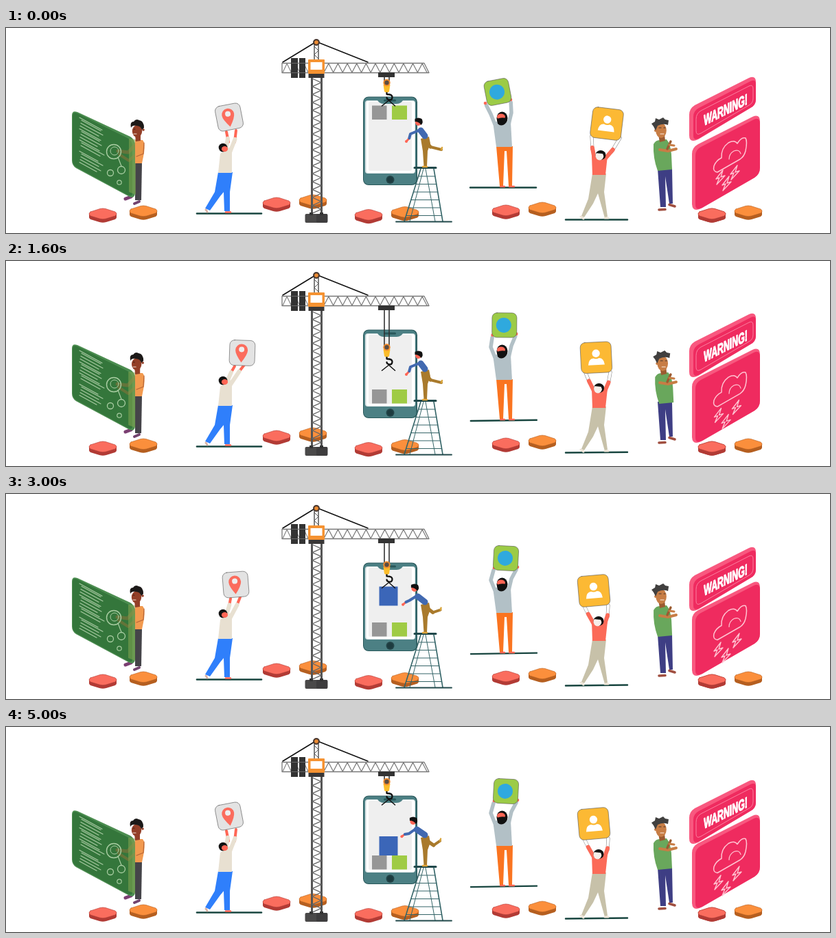
An HTML page with a canvas for the animation above (5200 ms loop, 1200x300 px).

```html
<!DOCTYPE html>
<html lang="en">
<head>
<meta charset="utf-8">
<title>App construction</title>
<style>
html, body { margin: 0; width: 100%; height: 100%; overflow: hidden; background: #fff; }
canvas { display: block; width: 1200px; height: 300px; }
</style>
</head>
<body>
<canvas id="stage" width="1200" height="300"></canvas>
<script>
const ctx = document.getElementById('stage').getContext('2d');
const LOOP = 5200, STEP = 200;
const RED = '#ff6655', INK = '#111', STEEL = '#555', TEAL = '#4c8084', DEEP = '#17453f';
ctx.lineJoin = ctx.lineCap = 'round';

// Drawing helpers
function fill(d, color) {
  ctx.fillStyle = color;
  ctx.fill(new Path2D(d));
}
function stroke(d, color, w = 1) {
  ctx.strokeStyle = color;
  ctx.lineWidth = w;
  ctx.stroke(new Path2D(d));
}
function rect(x, y, w, h, color, r = 0) {
  ctx.fillStyle = color;
  ctx.beginPath();
  ctx.roundRect(x, y, w, h, r);
  ctx.fill();
}
function dot(x, y, r, color, ry = r) {
  ctx.fillStyle = color;
  ctx.beginPath();
  ctx.ellipse(x, y, r, ry, 0, 0, Math.PI * 2);
  ctx.fill();
}
function ring(x, y, r, color, w) {
  ctx.strokeStyle = color;
  ctx.lineWidth = w;
  ctx.beginPath();
  ctx.arc(x, y, r, 0, Math.PI * 2);
  ctx.stroke();
}
function limb(color, w, ...pts) {
  ctx.strokeStyle = color;
  ctx.lineWidth = w;
  ctx.beginPath();
  pts.forEach(([x, y]) => ctx.lineTo(x, y));
  ctx.stroke();
}
function at(x, y, deg, draw) {
  ctx.save();
  ctx.translate(x, y);
  ctx.rotate(deg * Math.PI / 180);
  draw();
  ctx.restore();
}

// Motion helpers
const mix = (a, b, k) => a + (b - a) * k;
const mixPt = (a, b, k) => [mix(a[0], b[0], k), mix(a[1], b[1], k)];
function track(t, keys) {
  for (let i = 1; i < keys.length; i++) {
    const [t0, v0] = keys[i - 1], [t1, v1] = keys[i];
    if (t <= t1) return mix(v0, v1, (t - t0) / (t1 - t0));
  }
  return keys[keys.length - 1][1];
}
const SWAY = [[0, 0], [600, .45], [1000, 1], [1300, 1], [1600, .82], [2000, 0]];
const PIN = [[0, 0], [1400, 1], [1700, 1], [2450, 0], [2600, 0], [3400, 1], [3650, 1], [4950, 0]];
const REACH = [[0, 0], [1000, .9], [1600, 0], [2600, .5], [3600, 1], [4600, .5], [5000, .95]];
const LEAN = [[0, 0], [1000, 1], [1600, .9], [2600, 0], [3600, .1], [4600, .9], [5000, 0]];
const HOOK = [[0, 80], [1300, 154], [2100, 80], [2330, 80], [3700, 128], [4950, 80]];

function tile(x, y, top, side) {
  const d = 'M-18 -3L-4 -7.5Q0 -8.5 4 -7.5L18 -3Q22 0 18 3L5 7Q0 8.5 -5 7L-18 3Q-22 0 -18 -3Z';
  ctx.save();
  ctx.translate(x, y + 5);
  for (let i = 0; i < 5; i++) {
    fill(d, side);
    ctx.translate(0, -1);
  }
  fill(d, top);
  stroke(d, side, .6);
  ctx.restore();
}
function tiles() {
  for (const [x, y] of [[141, 272], [394, 256], [528, 273.5], [728, 267], [1028, 272]]) {
    tile(x, y, '#fa6d5e', '#b23b35');
    tile(x + (x < 150 ? 59 : 53), y - 4, '#fb8f3c', '#b55f20');
  }
}

function glassPanel() {
  fill('M96 128Q96 120 104 123L181 159Q188 163 188 172L188 242Q187 250 180 247L102 205Q96 201 96 194Z', '#4c8d50');
  fill('M97 129Q97 122 104 125L177 161Q184 165 184 173L184 241Q184 248 177 244L103 204Q97 200 97 194Z', '#34763b');
  for (let i = 0; i < 17; i++) {
    const x = 107 + (i * 7 % 4), y = 131 + i * 4.1, w = 33 - (i * 5 % 9);
    if (i !== 11) limb('#a9cba3', 1.1, [x, y], [x + w, y + w * .55]);
  }
}
function presenter(g) {
  const x = -1 - g, skin = '#933f28';
  limb('#7b3f72', 5, [174, 250], [182, 247]);
  glassPanel();
  fill('M188 197L198 197L197 252L188 252Z', '#454449');
  limb('#73446f', 4, [187, 257], [194, 254]);
  ctx.save();
  ctx.translate(x, 0);
  ctx.globalAlpha = .55;
  limb('#8c7339', 5, [190, 170], [179, 182], [164, 180]);
  limb('#8c7339', 4, [190, 185], [180, 194], [166, 185]);
  fill('M180 162L190 163L190 244L180 240Z', '#85a552');
  ctx.restore();
  fill('M188 164L199 164Q203 168 201 183L198 198L188 198Z', '#f29a4f');
  limb('#b76538', 1.2, [201, 168], [200, 184], [190, 188]);
  ctx.save();
  ctx.translate(x, 0);
  fill('M189 156L197 156L197 165L190 166Z', skin);
  dot(192, 151, 7.2, skin, 9);
  dot(201, 149, 1.8, skin);
  fill('M183 146Q181 137 187 137Q190 132 195 135Q202 136 202 146L199 149Q197 143 191 143Q185 142 183 146Z', '#1c1918');
  limb('#3a1d14', 1, [187, 148], [189, 148]);
  limb('#f2dfd3', 1.2, [187, 155], [191, 155]);
  ctx.restore();
  const chalk = '#a9cda2';
  ring(157, 181, 10.5, chalk, 1.4);
  ring(158, 180, 6, chalk, 1);
  limb(chalk, 1.2, [163, 189], [168, 202]);
  ring(168, 208, 5.5, chalk, 1.3);
  ring(152, 212, 4.5, chalk, 1.3);
  ring(165, 226, 3.2, chalk, 1.2);
}

function card(x, y, deg, size, color, icon) {
  at(x, y, deg, () => {
    rect(-size / 2, -size / 2, size, size, color, 7);
    ctx.strokeStyle = '#555';
    ctx.lineWidth = .6;
    ctx.stroke();
    icon();
  });
}
function pinBearer(k) {
  limb(DEEP, 2.6, [278, 271.5], [372, 271.5]);
  fill('M309 211L330 211L326 240L326 268L318 268L317 240L312 246L297 267L290 264L304 240Z', '#2f7ffb');
  limb(RED, 2.4, [320, 269.5], [327, 269.5]);
  limb('#d9b3a6', 3, [291, 266], [293, 269]);
  const handL = mixPt([321, 152], [333, 154], k), handR = mixPt([335, 150], [347, 152], k);
  const elbowL = mixPt([324, 167], [325, 168], k), elbowR = mixPt([333, 167], [337, 165], k);
  limb(RED, 4, handL, elbowL);
  limb(RED, 4, handR, elbowR);
  fill('M312 184L321 176L329 174L329 190L329 212L309 212Z', '#e8e0d1');
  limb('#e8e0d1', 6, mixPt(handL, elbowL, .65), [319, 184]);
  limb('#e8e0d1', 6, mixPt(handR, elbowR, .75), [326, 182]);
  dot(316, 175, 6.3, INK);
  dot(318.5, 177, 4.6, RED, 4);
  card(mix(325, 344, k), mix(130.5, 134.5, k), mix(-11, 2, k), 37, '#e3e3e3', () => {
    fill('M-1 14Q-10 2 -10 -4A9 9 0 0 1 8 -4Q8 2 -1 14Z', '#fb6c5d');
    dot(-1, -5, 4, '#eee');
  });
}

function zigzag(x0, x1, y0, y1, n, color) {
  const pts = [];
  for (let i = 0; i <= n; i++) pts.push([mix(x0, x1, i / n), i % 2 ? y0 : y1]);
  limb(color, 1.2, ...pts);
}
function crane() {
  limb(INK, 1.6, [403, 50], [452, 20], [527, 50]);
  limb('#777', 1.3, [402, 51.5], [609, 51.5], [616, 65.5], [402, 65.5], [402, 51.5]);
  zigzag(403, 440, 52, 65, 6, '#888');
  zigzag(463, 613, 52, 65, 22, '#777');
  rect(415, 44, 10, 29, '#333');
  rect(427, 44, 9, 29, '#333');
  limb('#777', .8, [416, 51.5], [436, 51.5]);
  limb('#777', .8, [416, 65.5], [436, 65.5]);
  for (const x of [445.5, 459.5]) limb(STEEL, 3, [x, 73], [x, 272]);
  const web = [];
  for (let i = 0; i <= 34; i++) web.push([i % 2 ? 459 : 446, 74 + i * 5.8]);
  limb('#666', 1.3, ...web);
  limb(STEEL, 1.5, [449, 25], [449, 46]);
  limb(STEEL, 1.5, [455, 25], [455, 46]);
  limb(STEEL, 1, [449, 27], [455, 33], [449, 39], [455, 45]);
  dot(452, 21, 5, '#4b3930');
  dot(452, 21, 2.8, '#ef8d32');
  rect(440, 46, 24, 21, '#f59231', 1);
  rect(443.5, 50, 17, 11, '#fff');
  rect(440.5, 67, 23, 6, '#393737');
  rect(435.5, 272, 33, 13, '#4a4949', 2);
  rect(452, 272, 16, 13, '#3e3d3e', 2);
  rect(442, 270, 5, 4, '#333');
  rect(457, 270, 5, 4, '#333');
}

function phone() {
  rect(520, 100.5, 79, 129.5, '#28575a', 8);
  rect(521, 101.5, 76.5, 127.5, TEAL, 7);
  rect(523, 106, 73, 107, '#dfe7e8', 4);
  rect(525, 107, 70, 105, '#fff', 3);
  rect(528, 108, 63, 101, '#efefef', 2);
  fill('M540 104L579 104Q576 111 569 111L550 111Q543 111 540 104Z', TEAL);
  rect(550, 104.5, 18, 3, '#28575a', 1.5);
  dot(559.5, 222, 6, '#24464a');
  dot(559.5, 222, 4.3, '#1d3b3f');
}
function load(t, y) {
  const top = t <= 1300 ? y + 33.5 : 188;
  rect(533, top, 21.5, 20.5, '#969696');
  rect(562, top, 22, 20.5, '#9fcb45');
  if (t > 2200) rect(543.5, t < 3700 ? y + 32 : 160, 27, 28, '#3b66b8');
}
function hook(y) {
  rect(542, 65, 24, 7, '#333');
  limb('#333', 1.6, [551, 72], [551, y]);
  limb('#333', 1.6, [558, 72], [558, y]);
  at(554.5, y, 0, () => {
    fill('M-5 3L5 3L3.5 13Q0 16 -3.5 13Z', '#fbbd2b');
    dot(0, 0, 5.2, '#f28c2e');
    dot(0, 0, 3.2, '#5c4d42');
    stroke('M0 15L0 17Q8 17 8 21Q8 26 3 25Q0 24 0 22', INK, 2.3);
    stroke('M-7 34L3 26L12 34', INK, 1.5);
  });
}

function ladder() {
  const c = '#356568';
  limb(c, 1.6, [604, 206], [580, 283]);
  limb(c, 1.6, [623, 206], [636, 283]);
  limb(c, 1, [608, 206], [588, 283]);
  limb(c, 1, [611, 206], [625, 283]);
  for (let y = 217; y < 280; y += 11.5) {
    const k = (y - 206) / 77;
    limb(c, 1.2, [604 - 24 * k, y], [623 + 13 * k, y]);
  }
  limb('#20484a', 3, [595, 204.5], [626, 204.5]);
  limb('#20484a', 1.8, [568, 283.5], [649, 283.5]);
}
function climber(k) {
  const pants = '#a97a2c', shirt = '#4169b0';
  const foot = mixPt([634, 178], [632, 166], k);
  limb(pants, 5.2, [611, 165], mixPt([618, 174], [623, 173], k));
  limb(pants, 4, mixPt([618, 174], [623, 173], k), foot);
  limb('#d9a53b', 2.4, foot, [foot[0] + 1, foot[1] - 3]);
  fill('M604 162L616 159L618 169L614 180L613 203L608.5 203L607 180Z', pants);
  limb('#e0a53b', 2.4, [607, 203], [613, 203]);
  const neck = mixPt([600, 147], [594, 147], k);
  const hand = mixPt([583, 166], [576, 160], k);
  limb(shirt, 9, [neck[0] + 4, neck[1] + 3], [610, 158]);
  limb(RED, 3, mixPt(hand, neck, .2), hand);
  limb(shirt, 4, [neck[0] + 1, neck[1] + 3], mixPt([589, 155], [587, 156], k), mixPt(hand, neck, .25));
  dot(hand[0], hand[1], 2, RED);
  const hx = mix(601.5, 593.5, k);
  dot(hx - 1, 138, 4.5, RED, 5);
  fill(`M${hx - 6} 133Q${hx - 1} 130 ${hx + 4} 133Q${hx + 7} 138 ${hx + 3} 142Q${hx} 137 ${hx - 6} 137Z`, INK);
}

function greenBearer(g) {
  const cloth = '#b2c0c6';
  limb(DEEP, 2.4, [676 + g, 233.5 + .6 * g], [772 + g, 233.5 - .9 * g]);
  fill('M714 173L738 173L737 231L732 231L729 180L726 180L724 231L719 231Z', '#fa7420');
  limb(RED, 2.4, [720, 232], [726, 232]);
  limb(RED, 2.4, [733, 232], [740, 232]);
  const left = mixPt([698, 110], [711, 108], g), right = mixPt([735, 105], [745, 107], g);
  for (const [hand, elbow, arm] of [[left, [706, 126], [712, 141]], [right, [736, 124], [732, 141]]]) {
    limb(cloth, 5.5, mixPt(hand, elbow, .2), elbow, arm);
    dot(hand[0], hand[1], 2.3, RED);
  }
  fill('M709 137L735 137L737 174L714 174Z', cloth);
  dot(722.5, 132, 8, INK, 9.5);
  dot(721, 130, 6, RED, 4.5);
  fill('M715 133Q721 130 729 132L727 140Q721 145 716 140Z', INK);
  card(mix(716, 728, g), mix(93.5, 94, g), mix(-11, 3, g), 36, '#9ccb46', () => dot(-1, 0, 11, '#2fa9de'));
}

function yellowBearer(g) {
  limb(DEEP, 2.4, [815, 280.5], [905, 280.5 - g]);
  fill('M854 213L874 213L871 240L876 276L872 278L862 242L855 257L842 277L838 275L848 250Z', '#c7c1a9');
  limb('#eee5d8', 3, [837, 276], [841, 279]);
  limb('#eee5d8', 3, [872, 278], [877, 278]);
  const left = mixPt([853, 158], [841, 162], g), right = mixPt([894, 161], [877, 163], g);
  const elbowL = mixPt([854, 178], [849, 178], g), elbowR = mixPt([882, 181], [876, 180], g);
  for (const [hand, elbow, arm] of [[left, elbowL, [857, 192]], [right, elbowR, [871, 193]]]) {
    limb('#777', 5, hand, elbow);
    limb('#fff', 4, hand, elbow);
    limb('#fb6a58', 6, mixPt(hand, elbow, .85), arm);
  }
  fill('M853 187L876 187L873 215L854 215Z', '#fb6a58');
  const hx = mix(866, 863, g);
  dot(hx, 186, 7.5, INK, 7);
  dot(hx - 1.5, 187, 6, '#f6eee9', 6.5);
  fill(`M${hx - 7} 183Q${hx} 176 ${hx + 7} 183L${hx + 6} 191L${hx + 3} 184Z`, INK);
  card(mix(875, 856, g), mix(140, 141.5, g), mix(7, -5, g), 45, '#fcb934', () => {
    dot(0, -6, 5.7, '#fff');
    fill('M-12 11Q-11 1 -4 1Q0 3 4 1Q11 1 12 11Z', '#fff');
  });
}

function thinker(k) {
  const skin = '#c77d45', dark = '#9b5b31';
  fill('M949 206L970 205L971 257L966 257L960 217L961 262L953 262Z', '#3e3e84');
  limb('#a04f40', 3.6, [951, 266], [960, 265.5]);
  limb('#a04f40', 3.6, [966, 258.5], [974, 261]);
  ctx.save();
  ctx.translate(2.5 * k, 0);
  fill('M943 170Q946 164 952 164L962 163Q968 170 969 185L970 207L949 209Q942 190 943 170Z', '#69a75c');
  fill('M950 156L959 156L960 165L952 167Z', dark);
  dot(954, 150, 7.8, skin, 11);
  dot(946, 150, 2, skin);
  fill('M940 140L945 137L946 132L951 134L957 131L960 134L965 135L964 142Q957 139 949 143L946 150L943 144Z', '#41403f');
  limb('#49372c', 1.2, [951, 146], [954, 146]);
  limb('#49372c', 1.2, [958, 146], [960, 146]);
  limb('#fff0e4', 1.2, [953, 155], [958, 155]);
  ctx.restore();
  limb(skin, 4, [952, 178], [964, 180], [976, 177]);
  limb(dark, 3.4, [963, 177], [968, 166]);
  limb(skin, 3, [966, 171], [973, 172]);
}

function warning(g) {
  const face = '#ef2b5f', edge = '#f8587f', chalk = '#ffc3d1';
  ctx.save();
  ctx.translate(0, 6 * g);
  fill('M995 127Q995 118 1003 113L1082 73Q1092 69 1092 79L1092 104Q1092 113 1084 117L1008 163Q995 169 995 157Z', edge);
  fill('M1001 130Q1001 121 1009 117L1084 78Q1092 74 1092 82L1092 105Q1092 113 1084 117L1010 161Q1001 166 1001 157Z', face);
  stroke('M1005 133Q1005 125 1012 121L1082 85Q1088 82 1088 89L1088 103Q1088 110 1082 113L1012 154Q1005 158 1005 151Z', '#fb7f9f', 1);
  // Isometric lettering
  ctx.transform(.56, -.28, 0, 1, 1048, 120);
  ctx.font = '900 22px "Liberation Sans", Arial, sans-serif';
  ctx.textAlign = 'center';
  ctx.textBaseline = 'middle';
  ctx.fillStyle = ctx.strokeStyle = '#fff';
  ctx.lineWidth = 1.3;
  ctx.fillText('WARNING!', 0, 1);
  ctx.strokeText('WARNING!', 0, 1);
  ctx.restore();

  fill('M999 184Q999 175 1008 170L1087 130Q1098 125 1098 137L1098 204Q1098 214 1090 219L1014 263Q1000 271 999 258Z', edge);
  fill('M1004 187Q1004 178 1012 174L1089 134Q1098 130 1098 140L1098 204Q1098 214 1090 219L1014 263Q1004 268 1004 258Z', face);
  ctx.save();
  ctx.translate(0, 2.5 * g);
  stroke('M1036 211Q1029 210 1031 202Q1034 194 1042 190Q1041 176 1052 168Q1061 163 1065 169Q1071 159 1077 161Q1080 166 1077 180Q1075 188 1069 192Z', chalk, 1.5);
  stroke('M1053 192Q1053 184 1060 180Q1068 177 1070 184', chalk, 1.2);
  ctx.restore();
  for (const [x, y, dx, dy] of [[1040, 219, -3, 9], [1061, 212, 3, 3], [1049, 228, -1, 9]]) {
    at(x + dx * g, y + dy * g, 0, () => stroke('M4 -11L-6 2L-1 0L-5 10L7 -3L1 -1Z', chalk, 1.4));
  }
}

function draw(t) {
  const g = track(t % 2000, SWAY), y = track(t, HOOK);
  ctx.fillStyle = '#fff';
  ctx.fillRect(0, 0, 1200, 300);
  tiles();
  presenter(g);
  pinBearer(track(t, PIN));
  crane();
  phone();
  load(t, y);
  hook(y);
  ladder();
  climber(track(t, REACH));
  greenBearer(g);
  yellowBearer(g);
  thinker(track(t, LEAN));
  warning(g);
  tile(1028, 272, '#fa6d5e', '#b23b35');
}

const start = performance.now();
function tick() {
  const t = (performance.now() - start) % LOOP;
  draw(Math.floor(t / STEP) * STEP);
  requestAnimationFrame(tick);
}
tick();
</script>
</body>
</html>
```
